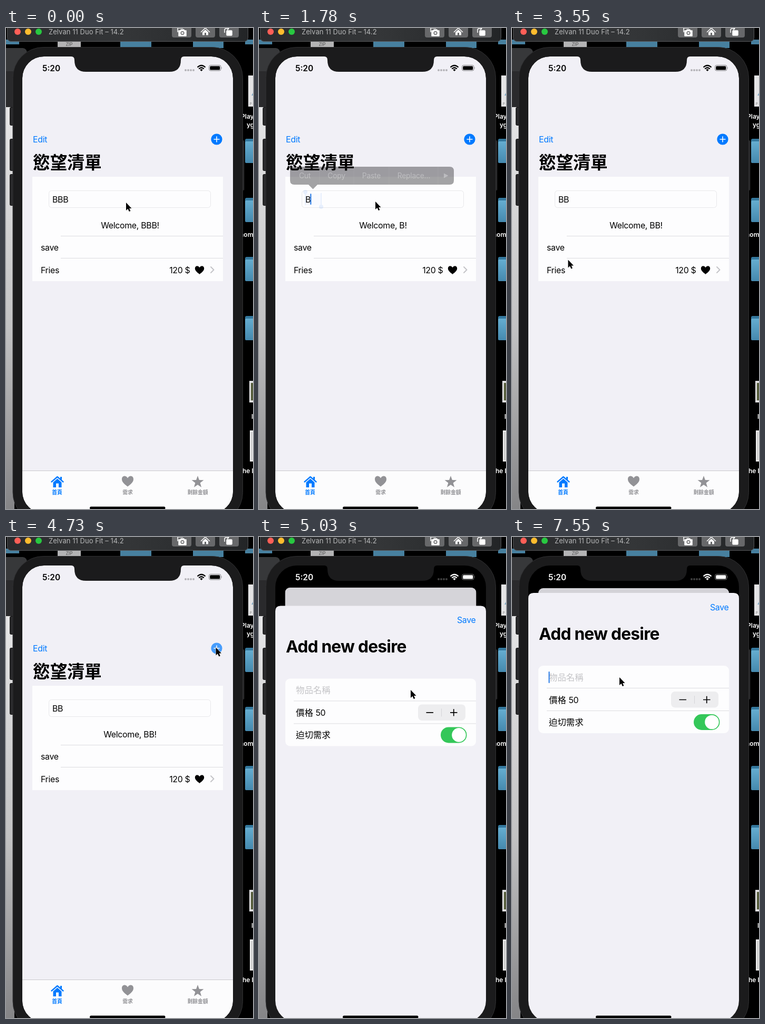
An HTML page for the animation above (8000 ms loop, 469 px wide and 912 px high).

```html
<!DOCTYPE html>
<html lang="zh-Hant">
<head>
<meta charset="utf-8">
<title>Wish list demo</title>
<style>
html, body { margin: 0; width: 100%; height: 100%; overflow: hidden; background: #000; }
svg { display: block; width: 469px; height: 912px; }
text { font-family: Inter, "Noto Sans CJK TC", "Noto Sans CJK JP", "Noto Sans CJK", sans-serif; }
.body { font-size: 15.9px; letter-spacing: -.3px; }
.cjk { font-size: 16.4px; }
.blue { fill: #007aff; }
.line { stroke: #dcdce0; }
.tab { font-size: 9.8px; font-weight: 700; text-anchor: middle; }
.menu { font-size: 13.8px; letter-spacing: -.2px; fill: #fff; text-anchor: middle; }
.desk { font-size: 12px; font-weight: 600; fill: #fff; }
</style>
</head>
<body>
<svg viewBox="0 0 469 912">
<defs>
  <linearGradient id="paper" x2="0" y2="1">
    <stop stop-color="#e6e6e7"/><stop offset=".55" stop-color="#c2c2c3"/><stop offset="1" stop-color="#858587"/>
  </linearGradient>
  <linearGradient id="bar"><stop stop-color="#2b2c2e"/><stop offset=".5" stop-color="#343638"/><stop offset="1" stop-color="#232527"/></linearGradient>
  <linearGradient id="blueFolder" x2="0" y2="1"><stop stop-color="#65add0"/><stop offset="1" stop-color="#4589ae"/></linearGradient>
  <clipPath id="screen"><rect x="31" y="54" width="400" height="866" rx="41"/></clipPath>
  <clipPath id="cardClip"><rect id="cardShape" width="400" height="866"/></clipPath>
  <path id="heart" d="M0 10C-5 6-11 2-11-4C-11-11-3-12 0-6C3-12 11-11 11-4C11 2 5 6 0 10Z"/>
  <g id="folder">
    <path d="M0 3Q0 0 3 0H20V12H0Z" fill="#34789d"/>
    <rect y="5" width="22" height="41" rx="2" fill="url(#blueFolder)"/>
  </g>
</defs>

<!-- desktop -->
<rect width="469" height="912"/>
<path d="M0 38H32Q40 39 40 48V150H0Z" fill="#37383a"/>
<path d="M0 82H40V150H0Z" fill="#2a2a2c"/>
<rect y="150" width="16" height="762" fill="url(#paper)"/>
<g fill="#47809f">
  <rect y="22" width="25" height="9"/><rect x="217" y="24" width="59" height="14"/>
  <rect x="355" y="24" width="58" height="14"/><rect x="454" y="22" width="15" height="9"/>
</g>
<rect x="98" y="22" width="44" height="16" fill="#b4b4b5"/>
<text x="120" y="33.5" font-size="8.5" text-anchor="middle" fill="#555">ZIP</text>
<g id="folders"></g>
<rect x="460" y="90" width="9" height="59" fill="#e4e4e5"/>
<path d="M466 128l3-5v5Z" fill="#82abc7"/><text x="463" y="146" font-size="6" fill="#777">P</text>
<rect x="462" y="669" width="7" height="41" fill="#dededf"/><rect x="465" y="673" width="4" height="33" fill="#59603f"/>
<rect x="463" y="763" width="6" height="59" fill="#e8e8e8"/><path d="M466.5 766v53" stroke="#aaa"/>
<g class="desk">
  <text x="446" y="172">Play</text><text x="457" y="188">yg</text><text x="444" y="396">hom</text>
  <text x="466" y="741">l</text><text x="449" y="844">he l</text>
</g>

<!-- simulator toolbar -->
<rect x="2.5" y="-12" width="457" height="37.5" rx="7" fill="url(#bar)" stroke="#58595b"/>
<circle cx="22" cy="7" r="6" fill="#ff5f57"/><circle cx="42" cy="7" r="6" fill="#febc2e"/><circle cx="62" cy="7" r="6" fill="#28c840"/>
<text x="81" y="12" font-size="13" letter-spacing=".05" fill="#b7b8b9">Zelvan 11 Duo Fit – 14.2</text>
<g fill="#67686a"><rect x="315" y="-5" width="37" height="23" rx="4"/><rect x="360" y="-5" width="37" height="23" rx="4"/><rect x="405" y="-5" width="37" height="23" rx="4"/></g>
<g fill="none" stroke="#fff" stroke-width="1.5" stroke-linejoin="round">
  <path d="M326 8V0H336"/><path d="M328 5H331L332.500 3H337.500L339 5H342V15H328Z" fill="#fff"/>
  <circle cx="335" cy="9.500" r="2.800" stroke="#67686a"/>
  <path d="M370 8L378.500 0L387 8"/><path d="M373 8L378.500 3L384 8V13.500H380V9H377V13.500H373Z" fill="#fff" stroke="none"/>
  <rect x="419" y="5" width="10" height="9" rx="1" fill="#fff"/><path d="M415 9V4Q415 1 418 1H422M420-2L423 1L420 4"/>
</g>

<!-- phone -->
<g fill="#29292b" stroke="#111">
  <rect x="7.500" y="150.500" width="9" height="34" rx="2"/><rect x="7.500" y="210.500" width="9" height="60" rx="2"/>
  <rect x="7.500" y="277.500" width="9" height="59" rx="2"/><rect x="444" y="213" width="8.500" height="95" rx="2"/>
</g>
<rect x="13" y="36.500" width="436.500" height="902" rx="58" fill="#1b1b1c" stroke="#303032"/>
<g clip-path="url(#screen)">
  <rect x="31" y="54" width="400" height="866"/>
  <g id="card"><g clip-path="url(#cardClip)"><g transform="translate(-31 -54)">
    <rect x="31" y="54" width="400" height="866" fill="#f1f0f6"/>
    <text class="body blue" x="51" y="216.500">Edit</text>
    <g id="add"><circle cx="400" cy="211" r="10.600" class="blue"/><path d="M395 211H405M400 206V216" stroke="#fff" stroke-width="1.600" stroke-linecap="round"/></g>
    <text x="51" y="267" font-size="32.700" font-weight="700">慾望清單</text>
    <rect x="50" y="282" width="362" height="198" fill="#fdfdfe"/>
    <rect id="rowTap" x="50" y="394" width="362" height="43" fill="#d1d1d6"/>
    <path class="line" d="M104 394.500H412M104 436.500H412"/>
    <rect x="81.500" y="308.500" width="307" height="32" rx="5" fill="none" stroke="#e8e8ea"/>
    <g id="pick" fill="#2f7cf6">
      <rect x="88" y="314" width="30" height="22" opacity=".2"/>
      <path d="M87 313h2v23h-2zM117 313h2v23h-2z"/><circle cx="88" cy="311" r="4"/><circle cx="118" cy="339" r="4"/>
    </g>
    <text id="field" class="body" x="88" y="330.500"></text>
    <rect id="caret" y="314" width="2" height="21" rx="1" fill="#2478e5"/>
    <text id="hello" class="body" x="235.500" y="380" text-anchor="middle"></text>
    <text class="body" x="66" y="422">save</text>
    <text class="body" x="66" y="464.500">Fries</text>
    <text class="body" x="349.500" y="464.500" text-anchor="end">120 $</text>
    <use href="#heart" transform="translate(367.500 459) scale(.79)"/>
    <path d="M389 453L394.500 458.500L389 464" fill="none" stroke="#c3c3c7" stroke-width="1.900" stroke-linecap="round" stroke-linejoin="round"/>
    <g id="menu">
      <path d="M67 263H362Q370 263 370 271V289Q370 297 362 297H111L102.500 305.500L94 297H67Q59 297 59 289V271Q59 263 67 263Z" fill="#1f1f21"/>
      <g id="menuText">
        <path d="M115 263V297M180 263V297M247 263V297M340 263V297" stroke="#68686b" stroke-width=".6"/>
        <text class="menu" x="87" y="285">Cut</text><text class="menu" x="147" y="285">Copy</text>
        <text class="menu" x="213.500" y="285">Paste</text><text class="menu" x="294" y="285">Replace…</text>
        <path d="M351 275.500L359.500 280L351 284.500Z" fill="#fff"/>
      </g>
    </g>
    <rect x="31" y="839" width="400" height="81" fill="#fcfcfd"/>
    <path d="M31 839.500H431" stroke="#c9c9cd"/>
    <path d="M86.500 860.500L97.500 851L108.500 860.500" fill="none" stroke="#007aff" stroke-width="2.400" stroke-linecap="round" stroke-linejoin="round"/>
    <path class="blue" d="M103 851H106V857L103 855ZM89.500 861.500L97.500 854.500L105.500 861.500V871H100V863.500H95V871H89.500Z"/>
    <use href="#heart" x="231" y="859.500" fill="#929296"/>
    <path id="star" fill="#929296"/>
    <text class="tab blue" x="97" y="883.500">首頁</text>
    <g fill="#929296"><text class="tab" x="231" y="883.500">需求</text><text class="tab" x="364" y="883.500">剩餘金額</text></g>
  </g></g></g>
  <rect id="dim" x="31" y="54" width="400" height="866"/>

  <g id="sheet">
    <path d="M31 920V116Q31 106 41 106H421Q431 106 431 116V940H31Z" fill="#f1f0f6"/>
    <text class="body blue" x="411.500" y="139" text-anchor="end">Save</text>
    <text x="51" y="195" font-size="31.700" font-weight="700" letter-spacing="-.75">Add new desire</text>
    <rect x="50" y="244" width="362" height="128" rx="9" fill="#fdfdfe"/>
    <path class="line" d="M66 286.500H412M66 329.500H412"/>
    <text class="cjk" x="70" y="272" fill="#c4c4c7">物品名稱</text>
    <rect id="caret2" x="69.500" y="255" width="2" height="22" rx="1" fill="#2478e5"/>
    <text class="cjk" x="70" y="314.500">價格 <tspan class="body">50</tspan></text>
    <text class="cjk" x="70" y="357">迫切需求</text>
    <rect x="302" y="293" width="90" height="30.500" rx="7.500" fill="#ededef"/>
    <path d="M346.500 301V316" stroke="#d5d5d8"/>
    <path d="M317.500 308.500H331M363 308.500H376.500M369.700 301.800V315.200" stroke="#000" stroke-width="1.700"/>
    <rect x="345" y="336" width="49.500" height="30" rx="15" fill="#34c759"/>
    <circle cx="379.500" cy="351" r="13.300" fill="#fff"/>
  </g>
  <g id="status" fill="currentColor">
    <text x="69" y="81.500" font-size="15.400" font-weight="600">5:20</text>
    <g opacity=".25"><circle cx="341" cy="80" r="2"/><circle cx="346" cy="80" r="2"/><circle cx="351" cy="80" r="2"/><circle cx="356" cy="80" r="2"/></g>
    <g fill="none" stroke="currentColor" stroke-width="2.200"><path d="M363.500 74.500Q371 67.500 378.500 74.500M366.200 77.500Q371 73 375.800 77.500"/></g>
    <path d="M371 82L368.300 79.200Q371 77 373.700 79.200Z"/>
    <rect x="385.500" y="70.500" width="22.500" height="10.500" rx="3" fill="none" stroke="currentColor" opacity=".45"/>
    <rect x="387.200" y="72.200" width="19" height="7.200" rx="1.500"/><path d="M409.300 74Q411 75.800 409.300 77.600Z" opacity=".5"/>
  </g>
  <rect x="159" y="907.500" width="143.500" height="5" rx="2.500"/>
</g>
<path d="M124 53V54Q130 54 130 61Q130 83 152 83H310Q332 83 332 61Q332 54 338 54V53Z" fill="#1b1b1c"/>
<path id="pointer" d="M0 0V15L3.400 11.800L5.800 17L8.400 15.900L6.100 10.900H10.500Z" stroke="#fff" stroke-width="1.100" paint-order="stroke"/>
</svg>
<script>
const LOOP = 8000, STEP = 147.8;
const $ = id => document.getElementById(id);
const set = (id, attrs) => { for (const k in attrs) $(id).setAttribute(k, attrs[k]); };
const show = (id, alpha) => set(id, { opacity: +alpha });
const within = (n, a, b) => n >= a && n <= b;

$("folders").innerHTML = [0, 1, 2, 3].map(i => `<use href="#folder" x="454" y="${210 + i * 112}"/>`).join("");
set("star", { d: "M" + Array.from({ length: 10 }, (_, i) => {
  const r = i % 2 ? 4.9 : 12, a = i * Math.PI / 5;
  return `${364 + r * Math.sin(a)} ${861 - r * Math.cos(a)}`;
}).join("L") + "Z" });

// pointer stops: step, x, y
const path = [
  [0, 228, 331], [1, 221, 329], [16, 221, 329], [18, 221, 346], [20, 184, 456], [21, 95, 418],
  [23, 95, 418], [25, 118, 461], [29, 390, 222], [30, 398, 203], [31, 399, 209], [33, 398, 210],
  [34, 288, 290], [38, 211, 254], [39, 212, 247], [41, 207, 259], [42, 204, 266], [60, 204, 266]
];
function pointerAt(n) {
  const i = path.findIndex(p => p[0] > n), a = path[i - 1], b = path[i];
  const k = (n - a[0]) / (b[0] - a[0]);
  return [a[1] + (b[1] - a[1]) * k, a[2] + (b[2] - a[2]) * k];
}

// critically damped rise of the sheet, 0 to 1
function rise(n) {
  if (n < 33) return 0;
  const x = .0216 * (100 + (n - 33) * 148);
  return 1 - (1 + x) * Math.exp(-x);
}

function draw(t) {
  const n = Math.floor(t / STEP);

  const name = "B".repeat(n < 12 ? 3 : n < 16 ? 1 : 2);
  $("field").textContent = name;
  $("hello").textContent = `Welcome, ${name}!`;
  set("caret", { x: 87.300 + 10 * name.length });
  show("caret", n === 1 || within(n, 12, 22) || within(n, 26, 28));
  show("pick", within(n, 2, 11) ? 1 : n === 12 ? .1 : 0);
  show("menu", n === 3 ? .6 : within(n, 4, 11) ? .93 : n === 12 ? .4 : 0);
  show("menuText", n === 12 ? .35 : 1);
  show("rowTap", n === 22);
  show("add", n === 32 ? .7 : 1);

  const p = rise(n);
  set("card", { transform: `translate(${31 + 19 * p} ${54 + 43 * p}) scale(${1 - .095 * p})` });
  set("cardShape", { rx: 41 - 31 * p });
  show("dim", .12 * p);
  set("sheet", { transform: `translate(0 ${814 * (1 - p)})` });
  $("status").style.color = p > .3 ? "#fff" : "#000";
  show("caret2", n === 50 ? .5 : within(n, 43, 47) || n > 50);

  set("pointer", { transform: `translate(${pointerAt(n)})` });
}

function tick() {
  draw(performance.now() % LOOP);
  requestAnimationFrame(tick);
}
tick();
</script>
</body>
</html>
```
